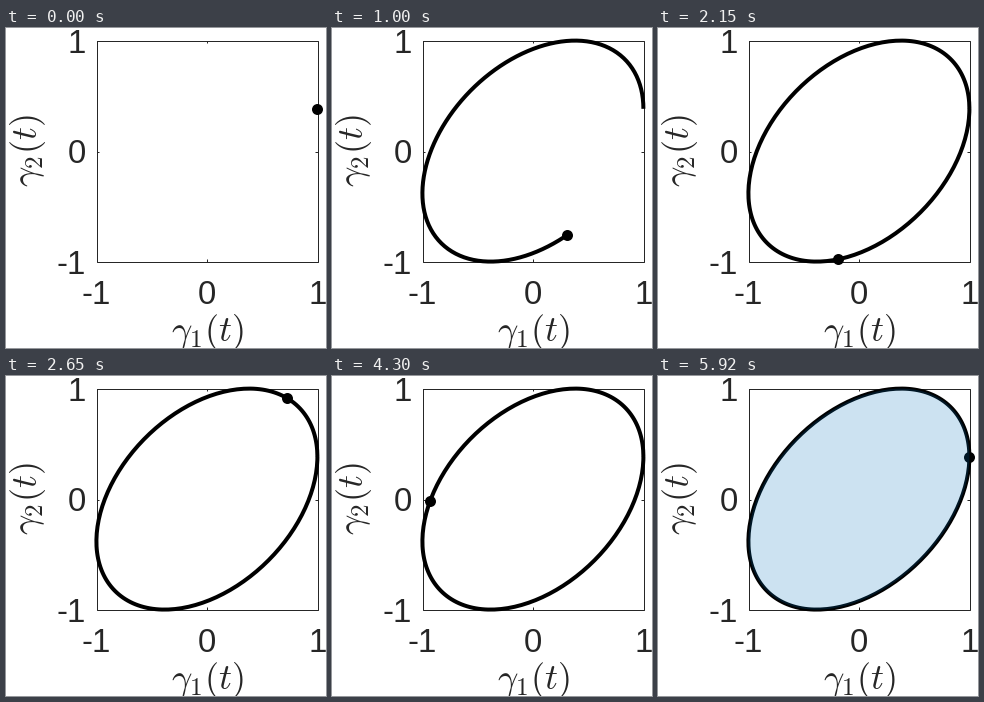
A matplotlib script for the animation above (9.84 s loop, 320 by 320 pixels).

```python
import numpy as np
import matplotlib.pyplot as plt
from matplotlib.animation import FuncAnimation

plt.rcParams["font.family"] = "Liberation Sans"
plt.rcParams["mathtext.fontset"] = "cm"

SIZE, DPI = 320, 80
PT = 72 / DPI                      # points per pixel
TICK_MS, LOOP_MS = 20, 9840
MOVE_MS, STEPS, LAPS = 50, 100, 4
FILL_MS = 5920
CX, CY, HALF = 200.9, 123.1, 110.5
PHASE = 3 * np.pi / 8
INK = (0.15, 0.15, 0.15)


def gamma(t):
    """Lissajous ellipse in stage pixels."""
    return CX + HALF * np.cos(t), CY - HALF * np.cos(t - PHASE)


fig = plt.figure(figsize=(SIZE / DPI, SIZE / DPI), dpi=DPI, facecolor="white")
ax = fig.add_axes([0, 0, 1, 1])
ax.set_xlim(0, SIZE)
ax.set_ylim(SIZE, 0)
ax.set_axis_off()


def rule(xs, ys):
    ax.plot(xs, ys, color=INK, lw=PT, zorder=1, solid_capstyle="butt")


def label(x, y, text, px, ha="center", rotation=0):
    ax.text(x, y, text, fontsize=px * PT, color=INK, ha=ha, va="baseline",
            rotation=rotation, rotation_mode="anchor")


# Frame, ticks and labels
left, right, top, bottom = 90.5, 311.5, 12.5, 233.5
rule([left, right, right, left, left], [top, top, bottom, bottom, top])
midx, midy, tick = 200.5, 123.5, 2.5
for edge, inward in ((top, tick), (bottom, -tick)):
    rule([midx, midx], [edge, edge + inward])
for edge, inward in ((left, tick), (right, -tick)):
    rule([edge, edge + inward], [midy, midy])

for v in (-1, 0, 1):
    label(CX + HALF * v, 276, str(v), 33)
    label(80, CY - HALF * v + 12.2, str(v), 33, ha="right")
label(201, 313, r"$\gamma_1(t)$", 36)
label(30.5, 123, r"$\gamma_2(t)$", 36, rotation=90)

# Moving parts
trail, = ax.plot([], [], color="black", lw=4 * PT, zorder=3,
                 solid_capstyle="butt", solid_joinstyle="round")
dot, = ax.plot([], [], "o", color="black", ms=11 * PT, mew=0, zorder=4)
area, = ax.fill(*gamma(np.linspace(0, 2 * np.pi, 240)),
                color=(0, 0.447, 0.741), alpha=0.2, lw=0, zorder=5)


def update(k):
    ms = k * TICK_MS + TICK_MS // 2    # middle of the tick
    step = min(ms // MOVE_MS, STEPS)
    t = 2 * np.pi * LAPS * step / STEPS
    trail.set_data(*gamma(np.linspace(0, min(t, 2 * np.pi), 200)))
    x, y = gamma(t)
    dot.set_data([x], [y])
    area.set_visible(ms >= FILL_MS)
    return trail, dot, area


anim = FuncAnimation(fig, update, frames=LOOP_MS // TICK_MS,
                     interval=TICK_MS, repeat=True, repeat_delay=0)
plt.show()
```
